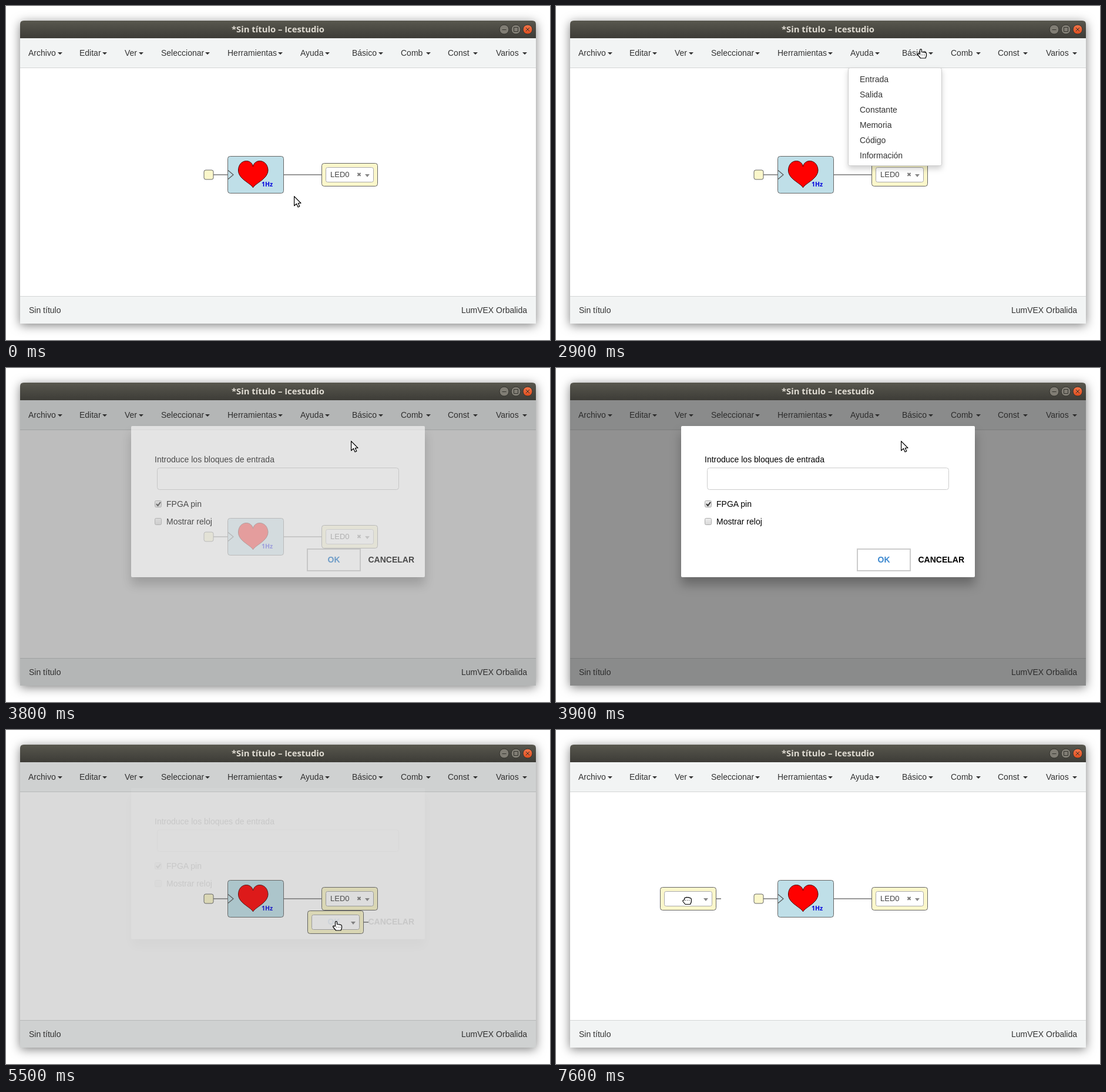
An HTML page for the animation above (8 s loop, 926x570 px).

```html
<!DOCTYPE html>
<html lang="es">
<head>
<meta charset="utf-8">
<title>Icestudio</title>
<style>
html, body { margin: 0; width: 100%; height: 100%; overflow: hidden; background: #fff; }
#win { position: absolute; left: 24px; top: 25px; width: 878px; height: 517px; border-radius: 6px 6px 0 0;
  box-shadow: 0 3px 17px rgba(0,0,0,.5); }
svg { position: absolute; left: 0; top: 0; font: 14px "Liberation Sans", Arial, sans-serif; fill: #333; }
.title { font: bold 14.8px "Open Sans", "Noto Sans", sans-serif; fill: #dfdbd2; }
.hz { font: bold 10.5px "Open Sans", "Noto Sans", sans-serif; fill: #00d; }
.wire { stroke: #777; stroke-width: 1.6; fill: none; }
.box { stroke: #666; }
.io { fill: #fbf7cb; }
#menu { filter: drop-shadow(0 5px 5px rgba(0,0,0,.18)); }
#panel { filter: drop-shadow(0 13px 9px rgba(0,0,0,.28)); }
#dialog text { fill: #000; }
#dialog .bold { font-weight: bold; }
#dialog .ok { fill: #3a87cf; }
#cursor path { fill: #fff; stroke: #000; stroke-width: 1.2; stroke-linejoin: round; }
#cursor .dots { stroke-width: 1; stroke-dasharray: 1 2; }
</style>
</head>
<body>
<div id="win"></div>
<svg width="926" height="570" viewBox="0 0 926 570">
  <defs>
    <linearGradient id="bar" x2="0" y2="1"><stop stop-color="#58574e"/><stop offset="1" stop-color="#3d3c37"/></linearGradient>
    <linearGradient id="close" x2="0" y2="1"><stop stop-color="#f3774c"/><stop offset="1" stop-color="#de4c1c"/></linearGradient>
    <linearGradient id="check" x2="0" y2="1"><stop stop-color="#eee"/><stop offset="1" stop-color="#d8d8d8"/></linearGradient>
    <g id="port">
      <rect class="box io" x=".5" y=".5" width="95" height="39" rx="4"/>
      <rect x="7.5" y="7.5" width="81" height="25" rx="3" fill="#fff" stroke="#aaa"/>
      <path d="M74 19h8l-4 5z" fill="#888"/>
    </g>
    <rect id="tick" x=".5" y=".5" width="11" height="11" rx="2" fill="url(#check)" stroke="#aaa"/>
  </defs>

  <path d="M24 55V31q0-6 6-6H896q6 0 6 6V55z" fill="url(#bar)"/>
  <text class="title" x="463" y="45" text-anchor="middle">*Sin título – Icestudio</text>
  <g stroke="#33322d">
    <circle cx="848" cy="40" r="8" fill="#807d74"/>
    <circle cx="868" cy="40" r="8" fill="#807d74"/>
    <circle cx="888" cy="40" r="8" fill="url(#close)"/>
    <path d="M844.5 40.5h7M864.5 36.5h7v7h-7zM885 37l6 6m0-6l-6 6" fill="none"/>
  </g>

  <path d="M24 55h878v487H24z" fill="#fff"/>
  <path d="M24 55h878v50H24zM24 496h878v46H24z" fill="#f2f4f4"/>
  <path d="M24 105.5h878M24 495.5h878" stroke="#d3d6d6"/>
  <g id="nav"></g>
  <text x="39" y="524">Sin título</text>
  <text x="887" y="524" text-anchor="end">LumVEX Orbalida</text>

  <path class="wire" d="M353 288h24M473 288h64"/>
  <rect class="box io" x="337" y="280" width="16" height="16" rx="3"/>
  <rect class="box" x="377.5" y="256.5" width="95" height="63" rx="4" fill="#bfdfe8"/>
  <path d="M378 280.500l9 7.500-9 7.500" fill="none" stroke="#555" stroke-width="1.2"/>
  <path d="M420.500 310C416 302 395 295 395.500 280C396 261 418 260 420.500 274C423 260 445 261 446 280C446 295 425 302 420.500 310z" fill="red" stroke="#400"/>
  <text class="hz" x="435" y="308">1Hz</text>
  <use href="#port" x="537" y="268"/>
  <text x="552" y="292" font-size="13" fill="#444">LED0</text>
  <path d="M598.500 285l5 5m0-5l-5 5" stroke="#777" stroke-width="2"/>

  <g id="block"><path class="wire" d="M96 20h8"/><use href="#port"/></g>

  <g id="menu">
    <rect x="497.5" y="105.5" width="159" height="167" rx="3" fill="#fff" stroke="#ccc"/>
    <rect id="hover" x="498" y="112" width="158" height="26" fill="#f5f5f5"/>
  </g>

  <rect id="dimmer" x="24" y="55" width="878" height="487" fill="#252525"/>
  <g id="dialog">
    <rect id="panel" x="213" y="99" width="500" height="258" rx="2" fill="#fff"/>
    <text x="253" y="161">Introduce los bloques de entrada</text>
    <rect x="257.5" y="170.5" width="411" height="37" rx="4" fill="#fff" stroke="#ccc"/>
    <use href="#tick" x="253" y="226"/>
    <path d="M256 232l2.500 2.800 4.500-6" fill="none" stroke="#333" stroke-width="2"/>
    <text x="273" y="237">FPGA pin</text>
    <use href="#tick" x="253" y="256"/>
    <text x="273" y="267">Mostrar reloj</text>
    <rect x="513" y="309" width="90" height="37" fill="#fff" stroke="#ccc" stroke-width="2"/>
    <text class="bold ok" x="558" y="332" text-anchor="middle">OK</text>
    <text class="bold" x="616.5" y="332">CANCELAR</text>
  </g>

  <g id="cursor">
    <g id="arrow"><path d="M.6.8V17l3.900-3.500 2.600 5.700 2.700-1.200-2.500-5.500H12z"/></g>
    <g id="hand">
      <path d="M4.500 9V2.200q0-1.600 1.500-1.600t1.500 1.600V5.500l6 .8q2 .4 2 2.200v3.500l-1.500 4H5.500L1 10.500q-1-2 .8-2.200z"/>
      <path class="dots" d="M6 10.500h8"/>
    </g>
    <g id="grab">
      <path d="M3.500 6V3.500q.8-2 2.800-1.200 1.400-1.800 3-.2 1.800-1.200 3 .6 2.600-.5 3 1.800v5l-1.800 4H5L1 8.500Q.2 6 3.500 6z"/>
      <path class="dots" d="M5 6.500h9"/>
    </g>
  </g>
</svg>
<script>
const $ = id => document.getElementById(id);
const LOOP = 8000, STEP = 100;

// label, text x, caret x
const NAV = [['Archivo', 38, 88], ['Editar', 125, 164], ['Ver', 202, 226], ['Seleccionar', 264, 339],
  ['Herramientas', 377, 463], ['Ayuda', 501, 543], ['Básico', 589, 634], ['Comb', 672, 715],
  ['Const', 752, 795], ['Varios', 834, 879]];
$('nav').innerHTML = NAV.map(([label, x, caret]) =>
  `<text x="${x}" y="85">${label}</text><path d="M${caret} 79h8l-4 4z"/>`).join('');

const ITEMS = ['Entrada', 'Salida', 'Constante', 'Memoria', 'Código', 'Información'];
$('menu').innerHTML += ITEMS.map((s, i) => `<text x="517" y="${130 + 26 * i}">${s}</text>`).join('');

// pointer path: time, x, y
const PATH = [
  [0, 490, 324], [100, 502, 333], [200, 502, 333], [300, 494, 344], [400, 486, 347], [600, 486, 347],
  [700, 483, 345], [900, 486, 326], [1200, 524, 262], [1500, 562, 209], [1600, 565, 202], [1800, 588, 160],
  [1900, 588, 160], [2200, 606, 107], [2400, 615, 73], [2900, 615, 73], [3100, 608, 86], [3200, 602, 91],
  [3300, 602, 91], [3500, 583, 124], [3700, 583, 124], [3800, 587, 124], [4200, 587, 124], [4500, 580, 127],
  [4700, 580, 127], [4800, 574, 163], [4900, 574, 163], [5200, 556, 326], [5500, 556, 326], [6000, 285, 317],
  [6200, 250, 305], [6800, 205, 283], [6900, 205, 283], [7000, 209, 283], [7200, 211, 283], [7500, 211, 283],
  [7600, 215, 284]];
// dialog fade: time, dimmer opacity, dialog opacity
const FADE = [[3700, 0, 0], [3800, .3, .6], [3900, .5, 1], [5300, .5, 1], [5400, .34, .5], [5500, .17, .08], [5600, 0, 0]];

function at(keys, t) {
  const i = keys.findIndex(k => k[0] > t);
  if (i === 0) return keys[0].slice(1);
  if (i < 0) return keys[keys.length - 1].slice(1);
  const a = keys[i - 1], b = keys[i], p = (t - a[0]) / (b[0] - a[0]);
  return [1, 2].map(n => a[n] + (b[n] - a[n]) * p);
}
const move = (id, x, y) => $(id).setAttribute('transform', `translate(${x} ${y})`);
const show = (id, on) => { $(id).style.display = on ? '' : 'none'; };
const snap = (v, origin) => origin + 8 * Math.round((v - origin) / 8);

function draw(t) {
  const [x, y] = at(PATH, t).map(Math.round);
  const [dim, panel] = at(FADE, t);
  const grab = t >= 5600;
  const hand = !grab && (t >= 2200 && t < 3800 || t >= 5200);
  move('cursor', x, y);
  show('arrow', !hand && !grab);
  show('hand', hand);
  show('grab', grab);

  show('block', t >= 5400);
  move('block', Math.max(177, snap(x - 44, 241)), snap(y - 17, 268));

  show('menu', t >= 2900 && t < 3700);
  show('hover', y >= 112);
  $('dimmer').style.opacity = dim;
  $('dialog').style.opacity = panel;
  show('dialog', panel > 0);
}

function tick() {
  draw(Math.floor(performance.now() % LOOP / STEP) * STEP);
  requestAnimationFrame(tick);
}
tick();
</script>
</body>
</html>
```
